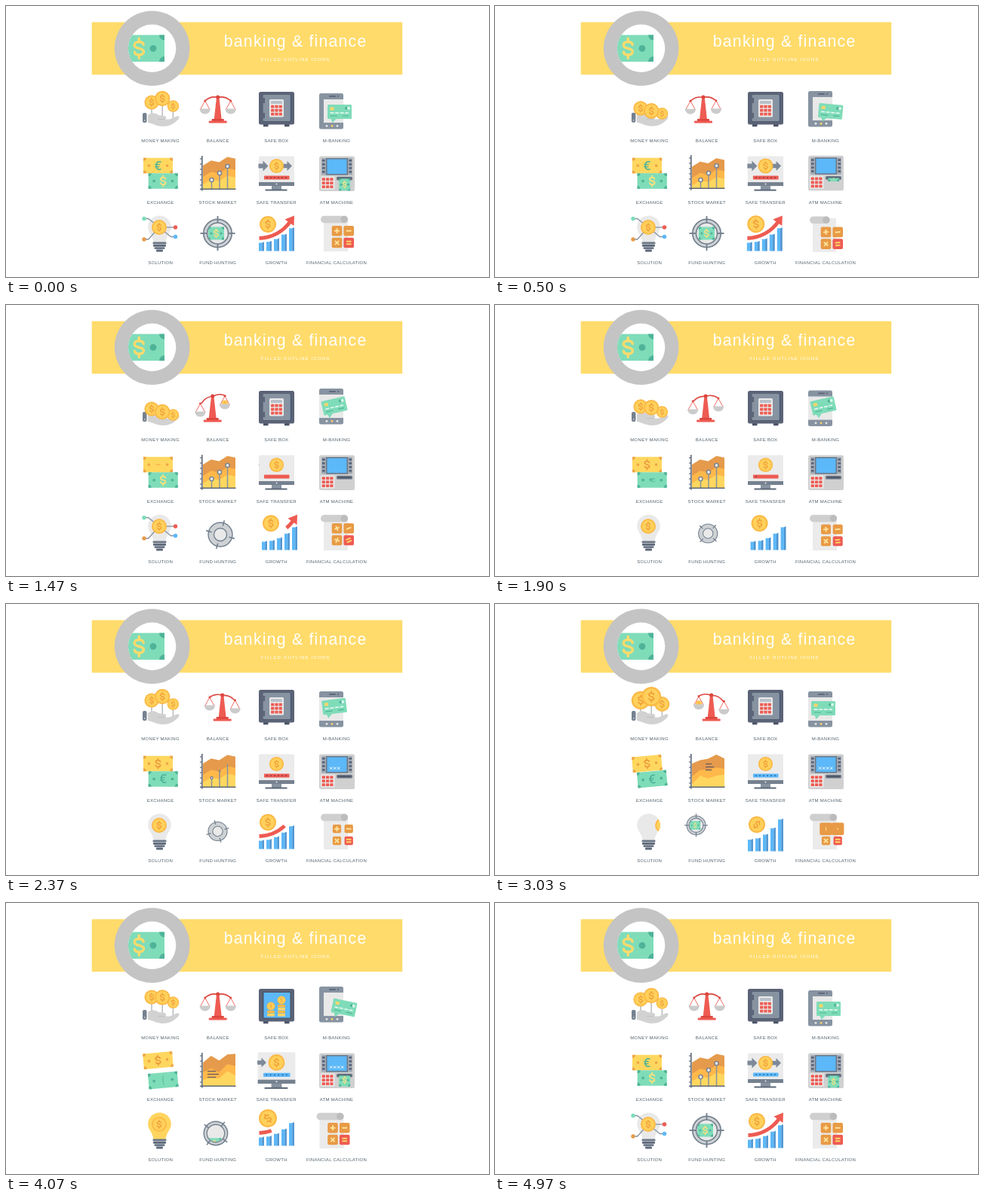
An HTML page for the animation above (5.01 s loop, 640 by 360 pixels).

```html
<!DOCTYPE html>
<html lang="en">
<head>
<meta charset="utf-8">
<title>Banking icons</title>
<style>
html, body { margin: 0; width: 100%; height: 100%; overflow: hidden; background: #fff; }
svg { display: block; }
text { font-family: "Liberation Sans", Arial, sans-serif; }
.euro { font-family: "Open Sans", sans-serif; font-weight: 600; text-anchor: middle; }
.label { font-size: 6px; letter-spacing: .27px; fill: #52616c; text-anchor: middle; }
.title { font-size: 21.2px; letter-spacing: 1.25px; fill: #fff; }
.sub { font-size: 6px; letter-spacing: 1.15px; fill: #fff; }
</style>
</head>
<body>
<svg width="640" height="360" viewBox="0 0 640 360">
  <g id="head"></g>
  <g id="icons"></g>
</svg>
<script>
const LOOP = 5010;
const slate = '#8793a1', steel = '#75818f', dark = '#5b6377', pale = '#e9e9e9', grey = '#cfcfcf', red = '#ee5b52',
  brick = '#dc463f', gold = '#ffd567', amber = '#fbb945', orange = '#e59a4c', green = '#7fdcb9', teal = '#4fb398',
  lemon = '#ffe07a', blue = '#5cb8f8', navy = '#4a92d0';
let t = 0;

// Smooth rise from 0 to 1 between two times
function ease(a, b) {
  const u = Math.min(1, Math.max(0, (t - a) / (b - a)));
  return u * u * (3 - 2 * u);
}
// Rise from a to b, hold, fall from c to d
const pulse = (a, b, c, d) => ease(a, b) - ease(c, d);
const between = (a, b) => t > a && t < b;

const rect = (x, y, w, h, fill, r = 0) => `<rect x="${x}" y="${y}" width="${Math.max(0, w)}" height="${Math.max(0, h)}" rx="${r}" fill="${fill}"/>`;
const disc = (x, y, r, fill, more = '') => `<circle cx="${x}" cy="${y}" r="${Math.max(0, r)}" fill="${fill}" ${more}/>`;
const ring = (x, y, r, fill, stroke, w) => disc(x, y, r, fill, `stroke="${stroke}" stroke-width="${w}"`);
const shape = (d, fill, more = '') => `<path d="${d}" fill="${fill}" ${more}/>`;
const line = (d, stroke, w, more = '') => `<path d="${d}" fill="none" stroke="${stroke}" stroke-width="${w}" ${more}/>`;
const place = (x, y, body, rot = 0, sx = 1, sy = sx) => `<g transform="translate(${x} ${y}) rotate(${rot}) scale(${sx} ${sy})">${body}</g>`;
const zoom = (x, y, s, body) => place(x, y, place(-x, -y, body), 0, s);
const clip = (id, x, y, r, body) => `<clipPath id="${id}"><circle cx="${x}" cy="${y}" r="${r}"/></clipPath><g clip-path="url(#${id})">${body}</g>`;
const row = (n, f) => Array.from({ length: n }, (_, i) => f(i)).join('');
const keypad = (x, y) => row(9, i => rect(x + i % 3 * 5.3, y + (i / 3 | 0) * 5, 4.2, 3.7, red, .5));

// Signs are drawn at a given total height
const dollar = (h, fill) => place(0, 0, line('M3.2 -2.6C2.6 -5.4 -3.3 -5.4 -3.3 -2.3C-3.3 .7 3.3 -.7 3.3 2.3C3.3 5.4 -2.6 5.4 -3.2 2.6M0 -7V-4.6M0 4.6V7',
  fill, 1.8, 'stroke-linecap="round"'), 0, h / 15);
const euro = (h, fill) => `<text class="euro" y="${h * .45}" font-size="${h * 1.25}" fill="${fill}">€</text>`;
const coin = (x, y, r, rot = 0) => place(x, y, disc(0, 0, 10, amber) + disc(0, 0, 8.2, '#ffd05b') + dollar(11.5, '#f0a03a'), rot, r / 10);

function bill(w, h, fill, mark, inner) {
  const a = w / 2, b = h / 2, c = h * .19;
  const corner = (x, y) => shape(`M${x * a} ${y * b}h${-x * c}a${c} ${c} 0 0 ${x * y > 0 ? 1 : 0} ${x * c} ${-y * c}z`, mark);
  return rect(-a, -b, w, h, fill) + corner(-1, -1) + corner(1, -1) + corner(-1, 1) + corner(1, 1) +
    disc(-a * .62, 0, h * .09, mark) + disc(a * .62, 0, h * .09, mark) + inner;
}

function money() {
  const rest = pulse(0, .4, 1.7, 2.25), hop = pulse(.4, .9, 1.05, 1.4), bob = 3 * pulse(3.6, 4, 4.6, 4.9);
  const size = 1 + .1 * hop + .27 * pulse(2.5, 3, 3.05, 3.5);
  const base = [128, 123, 133], radius = [9.6, 10.2, 7.8];
  const x = i => 193 + i * 14.2;
  const y = i => base[i] + (138 + 4 * i - base[i]) * rest - hop * (20 + 5 * i) - bob * Math.cos(i * 2.5 + (t - 4.07) * 7);
  const stalks = rest > .6 ? '' : row(3, i => line(`M${x(i)} ${y(i)}V150`, '#b9bec3', 1.6));
  const hand = rect(181, 142, 5.5, 13, steel, 2) + disc(183.7, 152, .8, pale) +
    shape('M188 145C193 141 198 142 202 145L210 146C213 147 213 150 210 150.5L217 150.5 225 147C229 145 231 148 228 151C222 157 216 160 208 160C200 160 195 156 188 155Z', '#d2d2d2') +
    line('M201 150.5H211', '#bdbdbd', .8);
  return stalks + place(-hop, -3 * hop, hand) +
    [2, 0, 1].map(i => coin(x(i), y(i), radius[i] * size, 25 * hop)).join('');
}

function balance() {
  const x = 6 * pulse(1.6, 2.4, 3.1, 4.1) - 7 * pulse(.1, .75, 1.6, 2.2);
  const tilt = 11 * pulse(1.8, 2.8, 3.1, 3.9) - 17 * pulse(.4, 1.4, 1.5, 2.2), a = tilt * Math.PI / 180;
  const pan = side => place(side * 17 * Math.cos(a), 126 + side * 17 * Math.sin(a),
    line('M-6 11L0 0 6 11', red, .9) +
    ((side < 0 ? between(.6, 1.15) || between(2.8, 3.4) : between(1.2, 1.9)) ? coin(0, 9.5, 4) : '') +
    shape('M-7.2 10.5H7.2A7.2 7 0 0 1 -7.2 10.5Z', '#cbcbcb') + disc(0, 0, 1.4, brick));
  return place(280.7 + x, 0, pan(-1) + pan(1) +
    shape('M-1.8 122H1.8L5 151H-5Z', red) + rect(-8, 150, 16, 3, brick) + rect(-12, 152.5, 24, 3, red, 1) +
    place(0, 121, line('M-17 5Q-9 -2 0 .6Q9 -2 17 5', brick, 1.6), tilt) + disc(0, 121, 2.5, brick));
}

function safe() {
  const stack = (x, n) => row(n, i => rect(x - 5, 147 - i * 4, 10, 3.4, i % 2 ? amber : gold, 1)) + coin(x, 145 - n * 4, 5.5);
  const panel = rect(0, 0, 36, 35, slate, 1) + rect(0, 4, 2.5, 7, dark) + rect(0, 24, 2.5, 7, dark) +
    rect(8.5, 6, 19, 23.5, pale, 1.5) + rect(10.5, 8, 14.8, 4, '#b9c2ca') + keypad(10.6, 13.8);
  return place(1.3 * pulse(.5, .9, .95, 1.35), 0,
    rect(341, 155, 6.5, 5.2, '#4b5266') + rect(369, 155, 6.5, 5.2, '#4b5266') + rect(335, 114, 47, 43.5, dark, 2.5) +
    rect(340, 118, 38, 35.5, '#4b5266', 1) + rect(341.5, 119, 35, 33.5, blue) + stack(351, 2) + stack(365, 4) +
    place(340.5, 118, panel, 0, 1 - pulse(3.2, 3.7, 4.4, 4.8), 1));
}

function phone() {
  const wide = pulse(1, 1.4, 3.3, 3.9), lean = pulse(1, 1.4, 1.8, 3), m = 6 * (1 - wide);
  const up = pulse(.1, .8, 1.6, 2.2) + pulse(3.4, 4, 4.3, 4.8), out = pulse(.2, .85, 1, 1.4) + pulse(3.5, 4, 4.3, 4.8);
  const body = rect(415, 116, 32, 47.5, slate, 2.5) + rect(415 + m, 124, 32 - m, 31, pale) +
    rect(428, 119, 9, 1.7, dark, .8) + disc(440, 119.8, 1, dark) +
    row(3, i => disc(425 + i * 7, 159.3, 1.4, i == 1 ? gold : pale));
  const card = shape('M-12 8L-9.5 14.5L-3 8Z', green) + rect(-16, -9.5, 32, 19, green, 1.2) +
    rect(-12.5, -6, 5, 4, gold, .6) + line('M-12.5 1.6H12', '#eafaf4', 1.5, 'stroke-dasharray="5 1.6"') +
    line('M-12.5 5.5H-3M4 5.5H12', teal, 1.2) + disc(9, -4.7, 2, teal) + disc(12, -4.7, 2, '#d9f5ea');
  return place(0, -5 * up, body) +
    place(442 + 6 * out - 7 * wide, 140.5 - 1.5 * out - 2 * wide - 4.5 * lean, card, 12 * out - 13 * lean);
}

function exchange() {
  const rot = -5 * pulse(2.5, 2.95, 4.2, 4.75), size = 1 + .07 * pulse(.4, .9, .95, 1.35), apart = 3 * pulse(3.2, 4, 4.1, 4.7);
  // The sign turns over twice, changing currency half way
  const face = (a, b, tall, thin) => place(0, 0, tall > .5 && thin < .5 ? b : a, 0,
    Math.abs(Math.cos(Math.PI * thin)), Math.abs(Math.cos(Math.PI * tall)));
  return place(201.5, 212 - apart, bill(39, 20.5, '#ffd75f', '#eda547',
      face(euro(13, teal), dollar(14, '#ea9a3c'), ease(1.1, 1.8), ease(4.15, 4.65))), rot, size) +
    place(208.2, 232.5 + apart, bill(39, 20.5, green, teal,
      face(dollar(15, lemon), euro(13, teal), ease(1.6, 2.1), ease(3.8, 4.4))), rot, size);
}

function stock() {
  const hop = pulse(.2, .9, .95, 1.4), sway = 2.5 * (pulse(2.4, 3, 3.05, 3.6) - pulse(3.5, 4, 4.1, 4.7));
  const area = (y, fill, k) => shape('M261 243' + row(5, i =>
    `L${261 + i * 10.75} ${y - 2.3 * i - 4.5 * (i & 1) + 4 * hop + sway * Math.sin(i * 2 + k)}`) + 'V243Z', fill);
  const stem = 1 - pulse(2.4, 2.85, 4.35, 4.75);
  const pin = i => {
    const x = 272.5 + i * 10.5, y = 243 - (12 + 9 * i + 2 * hop * (i >> 1)) * stem;
    const head = 1 - pulse(2.2 - .1 * i, 2.6 - .1 * i, 4.5, 4.9);
    return line(`M${x} ${y}V243`, slate, 1.5) + (head > .05 ? ring(x, y, 2.6 * head, pale, steel, 1.4) : '');
  };
  const len = pulse(2.6, 2.95, 4.1, 4.4), move = ease(3.1, 3.9);
  const note = row(3, i => line(`M${279 - 12 * move} ${212.5 + 11 * move + i * 4}h${(11 + 4 * move) * len * (i & 1 ? 1 : .75)}`, '#6b5a63', 1.3));
  return area(212, orange, 0) + area(227, '#ffb84a', 1) + area(237, '#ffd75f', 2) +
    (stem > 0 ? row(3, pin) : '') + (len > 0 ? note : '') +
    place(0, -2.7 * hop, line('M259.8 199V245.5M257 243.3H304.5', '#5d6878', 1.6) +
      row(6, i => line(`M257 ${203 + i * 7}H260`, '#5d6878', 1.2)));
}

function transfer() {
  const left = 1 - pulse(.9, 1.6, 3.65, 4.2), right = 1 - pulse(.9, 1.45, 4.2, 4.65);
  const dots = 6 * (1 - pulse(1.05, 1.35, 1.8, 2.25)), hop = pulse(.3, .9, .95, 1.4), grow = pulse(3.6, 4, 4.1, 4.5);
  const arrow = shape('M0 -3H6V-7L13 0 6 7V3H0Z', '#7d8998');
  const [bar, dot] = t < 2.7 ? [red, '#8f3f45'] : [blue, '#2f6fa8'];
  return zoom(358.5, 222, 1 + .02 * hop + .06 * grow,
    rect(335, 199.5, 47, 35, '#ebebeb', 1.5) + rect(335, 234, 47, 5, steel) + disc(358.5, 236.5, 1, pale) +
    rect(352, 239, 13, 5, slate) + rect(343.5, 243.5, 29, 2, '#5d6878') + rect(342, 225.5, 33.5, 5, bar, .8) +
    row(6, i => i < dots ? disc(346 + i * 5, 228, 1, dot) : '') +
    place(334.5, 212.5, arrow, 0, left) + place(367, 212.5, arrow, 0, right * .92) +
    coin(358.5, 212.5, 9.6 + 1.4 * hop + .6 * grow));
}

function atm() {
  const out = 1 - pulse(.15, .7, 3.6, 4.2), stars = between(2.1, 4.5) ? Math.min(4, (t - 2.1) * 12) : 0;
  const note = bill(15, 17, green, teal, dollar(10, lemon));
  return place(0, -2.7 * pulse(.3, .9, .95, 1.35),
    rect(415, 199.5, 47, 46.5, '#d0d0d0', 2.5) + rect(418, 202, 41, 22.5, '#a2abb5', 1) +
    rect(424, 202, 29, 22.5, '#6b7787') + rect(425.5, 203.5, 26, 19.5, blue) +
    row(4, i => rect(419, 204 + i * 5, 3.6, 2.6, dark) + rect(454.4, 204 + i * 5, 3.6, 2.6, dark)) +
    row(Math.floor(stars), i => line(`M${429 + i * 5} 216.5l3.2 3.2m0 -3.2l-3.2 3.2`, '#fff', 1)) +
    rect(417, 226.5, 18.5, 17, pale, 1) + keypad(418.7, 228.2) +
    rect(438, 226.8, 21, 4.6, '#6b7787', 1.5) + rect(440, 228.5, 17, 1.4, '#454c5c') +
    (out ? `<svg x="441" y="229.2" width="15.5" height="16">${place(7.7, 8 - 17 * (1 - out), note)}</svg>` : ''));
}

function solution() {
  const spread = 1 - pulse(1.6, 2.1, 4.4, 4.9), lit = pulse(3.3, 3.7, 4.35, 4.65);
  const x = t < 3.2 ? 203 + 26 * ease(2.7, 3.2) : 177 + 26 * ease(3.2, 3.7);
  const glass = 'M203.5 278.5A15.3 15.3 0 0 1 218.8 294C218.8 301 212.5 304 211.5 314H195.5C194.5 304 188.2 301 188.2 294A15.3 15.3 0 0 1 203.5 278.5Z';
  const node = (dx, dy, fill) => place(203, 294,
    line(`M0 0L${dx * .72} ${dy}H${dx}`, slate, 1.3) + disc(dx, dy, 2.7, fill), 0, spread);
  return shape(glass, pale) + shape(glass, '#ffd55f', `opacity="${lit}"`) +
    node(-20, -11.5, green) + node(21.5, 0, red) + node(21.5, 12.5, blue) + node(-20, 16, orange) +
    clip('bulb', 203.5, 294, 15.3, coin(x, 294, 10)) +
    row(4, i => rect(194.5 + i * i * .5, 313.4 + i * 3.4, 18 - i * i, 2.9, i & 1 ? '#5d6878' : '#6b7787', 1));
}

function hunting() {
  const slip = pulse(1, 1.45, 1.5, 2.3), shut = pulse(1, 1.4, 2.5, 2.9);
  const x = 280.5 + 3.5 * slip - 14 * pulse(2.55, 3, 3.2, 4.4);
  const y = 302 + 3 * slip - 8 * pulse(2.5, 3, 3.2, 3.7) + 4 * pulse(3.5, 4, 4.1, 4.6);
  const size = 1 - .33 * pulse(1.1, 1.9, 3.2, 4.9), rot = 90 * (ease(.95, 2.9) + ease(3.4, 4.9));
  const bx = t < 1.8 ? -2 + 34 * ease(.35, 1.4) : -36 + 34 * ease(2.3, 2.9);
  return place(x, y,
    ring(0, 0, 18.7, '#ced2d5', steel, 1.7) + ring(0, 0, 14 - 4 * shut, pale, steel, 1.6) +
    clip('scope', 0, 0, 13.2 - 4 * shut, place(bx, 16 * pulse(3.4, 4, 4.1, 4.7), bill(21, 17, green, teal, dollar(12, lemon)))) +
    row(4, i => place(0, 0, line('M0 -23V-14', steel, 1.9), rot + i * 90)), 0, size);
}

function growth() {
  const swell = pulse(.3, .9, .95, 1.4), drop = pulse(2.5, 3, 3.05, 3.5), lift = pulse(3.7, 4, 4.1, 4.6);
  const dx = 4 * pulse(1.1, 1.45, 1.8, 2.3) - 3 * pulse(.2, .9, 1, 1.2);
  const bars = row(5, i => {
    const h = (11 + 1.2 * i * i) * (1 + .4 * drop), x = 335 + i * 10;
    return rect(x, 325.5 - h, 4.3, h, blue) + shape(`M${x + 4.3} ${325.5 - h}l2.6 -1.2V325.5h-2.6z`, navy);
  });
  const from = t < 1.9 ? 100 * ease(.95, 1.75) : 0;
  const to = t < 1.9 ? 100 : 76 * pulse(1.95, 2.35, 2.5, 2.9) + 100 * ease(3.7, 4.65);
  const arrow = (to - from > .5 ? line('M335.5 308.5C352 308 367 300 377 286', red, 4.8,
      `pathLength="100" stroke-dasharray="0 ${from} ${to - from} 200"`) : '') +
    (between(1.8, 4.6) ? '' : shape('M382 278.5L381.5 292 369.5 283.5Z', red));
  return place(dx, 3 * (drop - lift), bars + arrow) +
    coin(347 + dx, 290 - swell + 3 * drop - 4 * lift, 11 + 2 * swell + lift, 40 * (drop - lift) - 20 * swell);
}

function calc() {
  const down = pulse(.3, .9, .95, 1.4), grow = pulse(2.6, 3, 3.05, 3.5), curl = 36 * (1 - down);
  const rot = -22 * pulse(.3, .9, 1.5, 2.1), dy = 6.3 * down - 2 * pulse(1, 1.4, 1.5, 2.2);
  const marks = ['M-3.4 0H3.4M0 -3.4V3.4', 'M-3.4 0H3.4', 'M-2.6 -2.6L2.6 2.6M2.6 -2.6L-2.6 2.6', 'M-3.3 -1.8H3.3M-3.3 1.8H3.3'];
  const key = i => {
    const upper = i < 2, s = 13.6 - 2.3 * pulse(1.7, 2.3, upper ? 2.5 : 3.1, upper ? 2.9 : 3.6) + (upper ? 2.8 * grow : 0);
    return place(438.5 + i % 2 * 15.7, 298.7 + (i >> 1) * 15.8 + dy,
      rect(-s / 2, -s / 2, s, s, i == 3 ? red : '#e89a45', 2) +
      place(0, 0, line(marks[i], i == 3 ? gold : '#ffe29a', 1.9), rot, upper ? 1 - .8 * grow : 1, 1));
  };
  const paper = rect(421, 281, 32 - 4 * down, 45, '#ebebeb') + rect(417, 278.8, curl, 9.5, grey, Math.min(4.7, curl / 2)) +
    (curl > 10 ? disc(412.3 + curl, 283.5, 4.7, '#bcbcbc') : shape('M416 283H425V289Z', grey));
  return place(-5.5 * pulse(3.5, 4, 4.1, 4.7), 0, place(0, 3 * down, paper) + row(4, key));
}

const names = ['MONEY MAKING', 'BALANCE', 'SAFE BOX', 'M-BANKING', 'EXCHANGE', 'STOCK MARKET', 'SAFE TRANSFER', 'ATM MACHINE',
  'SOLUTION', 'FUND HUNTING', 'GROWTH', 'FINANCIAL CALCULATION'];
const columns = [204.6, 280.8, 358.3, 438], rows = [181.1, 263.2, 342.8];

document.getElementById('head').innerHTML =
  rect(113.7, 21.5, 411.5, 69.8, '#ffdb6b') + disc(193.6, 56.3, 49.8, '#c4c4c4') + disc(193.6, 56.3, 31.7, '#fff') +
  clip('lens', 193.6, 56.3, 31.7, rect(160, 38.5, 50, 35.5, green) + disc(195, 56.3, 4.4, teal) +
    shape('M210 38.5H203A7 7 0 0 0 210 45.5ZM210 74H203A7 7 0 0 1 210 67Z', teal) + place(176.3, 56.3, dollar(28, '#ffdb6b'))) +
  '<text class="title" x="288.8" y="53.9">banking &amp; finance</text><text class="sub" x="337.8" y="73.1">FILLED OUTLINE ICONS</text>' +
  names.map((s, i) => `<text class="label" x="${columns[i % 4]}" y="${rows[i >> 2]}">${s}</text>`).join('');

const icons = document.getElementById('icons');
const parts = [money, balance, safe, phone, exchange, stock, transfer, atm, solution, hunting, growth, calc];
const start = performance.now();
function draw() {
  t = (performance.now() - start) % LOOP / 1000;
  icons.innerHTML = parts.map(part => part()).join('');
  requestAnimationFrame(draw);
}
draw();
</script>
</body>
</html>
```
